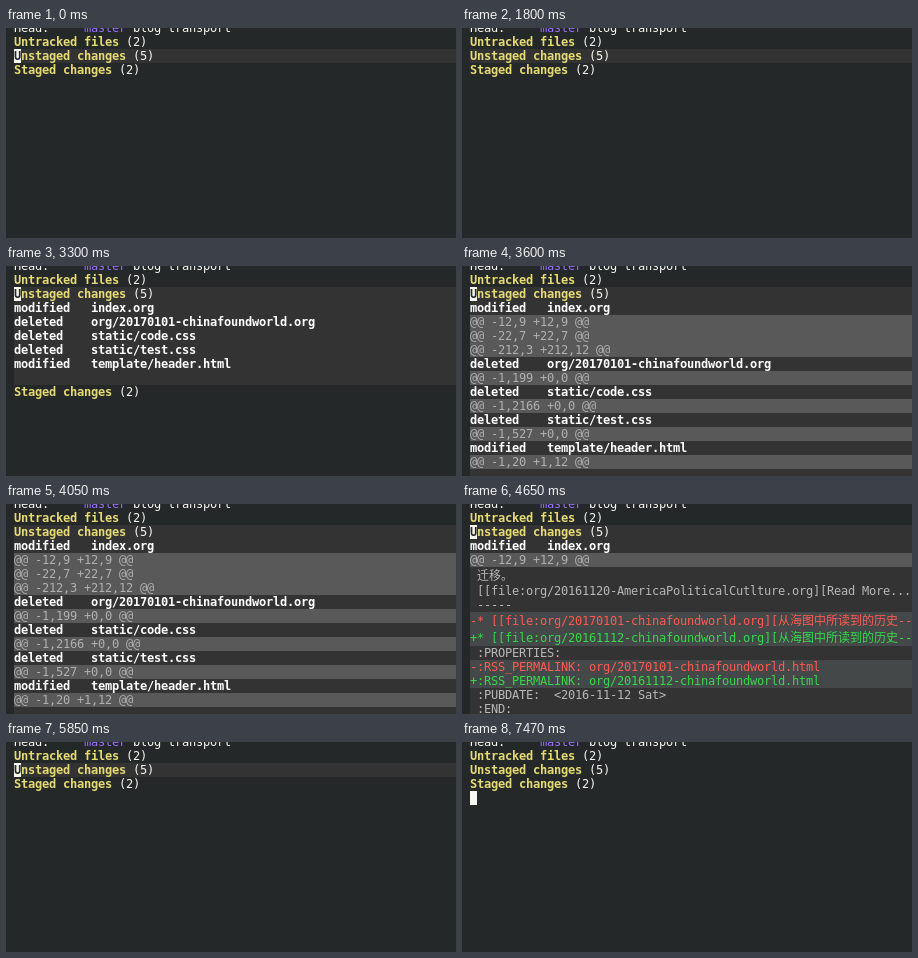
Recreate the animation shown at these times as an HTML page. Size 450 by 210 pixels, loop 7.62 s.

```html
<!DOCTYPE html>
<html lang="en">
<head>
<meta charset="utf-8">
<title>Folding sections in a status buffer</title>
<style>
  html, body { margin: 0; width: 100%; height: 100%; overflow: hidden; background: #242828; }
  svg { display: block; width: 450px; height: 210px; }
  text { font: 12px "DejaVu Sans Mono", monospace; letter-spacing: -.2246px; white-space: pre; fill: #f8f8f2; }
  .section { font-weight: bold; fill: #e6db74; }
  .file { font-weight: bold; fill: #fff; }
  .branch { fill: #9a70ff; }
  .hunk { fill: #b0b0b0; }
  .context { fill: #b8b8b8; }
  .removed { fill: #ff5a50; }
  .added { fill: #35d84a; }
  .wide { font-family: "Noto Sans CJK SC", "Noto Sans CJK", sans-serif; letter-spacing: 0; }
  .under-cursor { font-weight: bold; fill: #242828; }
</style>
</head>
<body>
<svg viewBox="0 0 450 210" xmlns="http://www.w3.org/2000/svg"></svg>
<script>
(() => {
  const LEFT = 8, CELL = 7, LINE = 14, WIDE_LINE = 17, WIDE_CELL = 12;
  const SHADE = { selected: '#333333', hunk: '#595959', changed: '#444848' };
  const LOOP = 7620;
  const CJK = /([\u3000-\u9fff]+)/;
  const svg = document.querySelector('svg');

  function add(parent, tag, attrs, content = '') {
    const node = document.createElementNS(svg.namespaceURI, tag);
    for (const key in attrs) node.setAttribute(key, attrs[key]);
    node.textContent = content;
    return parent.appendChild(node);
  }

  // A row is { shade, runs: [[class, text], ...] }.
  const row = (shade, ...runs) => ({ shade, runs });
  const section = (title, count, shade) => row(shade, ['section', title], ['', ` (${count})`]);
  const file = (state, path) => row('selected', ['file', state.padEnd(11) + path]);
  const hunk = range => row('hunk', ['hunk', `@@ ${range} @@`]);
  const context = text => row('selected', ['context', ' ' + text]);
  const removed = text => row('changed', ['removed', '-' + text]);
  const added = text => row('changed', ['added', '+' + text]);

  function drawRow(parent, { shade, runs }, y) {
    const tall = runs.some(([, text]) => CJK.test(text));
    const height = tall ? WIDE_LINE : LINE;
    const baseline = y + (tall ? 13 : 11);
    if (shade) add(parent, 'rect', { x: LEFT, y, width: 450 - LEFT, height, fill: SHADE[shade] });
    let x = LEFT;
    for (const [kind, text] of runs) {
      for (const part of text.split(CJK).filter(Boolean)) {
        const wide = CJK.test(part);
        add(parent, 'text', { x, y: baseline, class: wide ? kind + ' wide' : kind }, part);
        x += part.length * (wide ? WIDE_CELL : CELL);
      }
    }
    return y + height;
  }

  function makeScreen(rows) {
    const group = add(svg, 'g', { display: 'none' });
    rows.reduce((y, item) => drawRow(group, item, y), -7);
    return group;
  }

  const head = row('', ['', 'Head:     '], ['branch', 'master'], ['', ' blog transport']);
  const untracked = section('Untracked files', 2);
  const unstaged = section('Unstaged changes', 5, 'selected');
  const staged = section('Staged changes', 2);
  const blank = row('selected');
  const intro = [head, untracked, unstaged];

  const files = [
    ['modified', 'index.org', '-12,9 +12,9', '-22,7 +22,7', '-212,3 +212,12'],
    ['deleted', 'org/20170101-chinafoundworld.org', '-1,199 +0,0'],
    ['deleted', 'static/code.css', '-1,2166 +0,0'],
    ['deleted', 'static/test.css', '-1,527 +0,0'],
    ['modified', 'template/header.html', '-1,20 +1,12']
  ];
  const heading = '从海图中所读到的历史----';

  const screens = {
    folded: makeScreen([...intro, staged]),
    files: makeScreen([...intro, ...files.map(([state, path]) => file(state, path)), blank, staged]),
    hunks: makeScreen([
      ...intro,
      ...files.flatMap(([state, path, ...ranges]) => [file(state, path), ...ranges.map(hunk)]),
      blank
    ]),
    diff: makeScreen([
      ...intro,
      file('modified', 'index.org'),
      hunk('-12,9 +12,9'),
      context('迁移。'),
      context('[[file:org/20161120-AmericaPoliticalCutlture.org][Read More...'),
      context('-----'),
      removed('* [[file:org/20170101-chinafoundworld.org][' + heading),
      added('* [[file:org/20161112-chinafoundworld.org][' + heading),
      context(':PROPERTIES:'),
      removed(':RSS_PERMALINK: org/20170101-chinafoundworld.html'),
      added(':RSS_PERMALINK: org/20161112-chinafoundworld.html'),
      context(':PUBDATE:  <2016-11-12 Sat>'),
      context(':END:')
    ]),
    plain: makeScreen([head, untracked, section('Unstaged changes', 5), staged])
  };

  const cursor = add(svg, 'rect', { x: LEFT, width: CELL, height: LINE, fill: '#f8f8f2' });
  const letter = add(svg, 'text', { x: LEFT, y: 32, class: 'under-cursor' }, 'U');

  // Each track lists [start in ms, value]; values hold until the next start.
  const screenTrack = [
    [0, 'folded'], [2400, 'files'], [3600, 'hunks'], [4650, 'diff'], [5850, 'folded'], [7470, 'plain']
  ];
  const blinkTrack = [
    [0, true], [450, false], [900, true], [1800, false], [2400, true], [2850, false], [3300, true],
    [4050, false], [4650, true], [5250, false], [5700, true], [6290, false], [6880, true]
  ];
  const cursorTrack = [[0, 21], [7330, 49]];
  const valueAt = (track, time) => track.filter(([start]) => start <= time).pop()[1];
  const show = (node, visible) => node.setAttribute('display', visible ? 'inline' : 'none');

  function render(time) {
    const current = valueAt(screenTrack, time);
    for (const key in screens) show(screens[key], key === current);
    const visible = valueAt(blinkTrack, time);
    const y = valueAt(cursorTrack, time);
    cursor.setAttribute('y', y);
    show(cursor, visible);
    show(letter, visible && y === 21);
  }

  const began = performance.now();
  function tick() {
    render((performance.now() - began) % LOOP);
    requestAnimationFrame(tick);
  }
  tick();
})();
</script>
</body>
</html>
```
